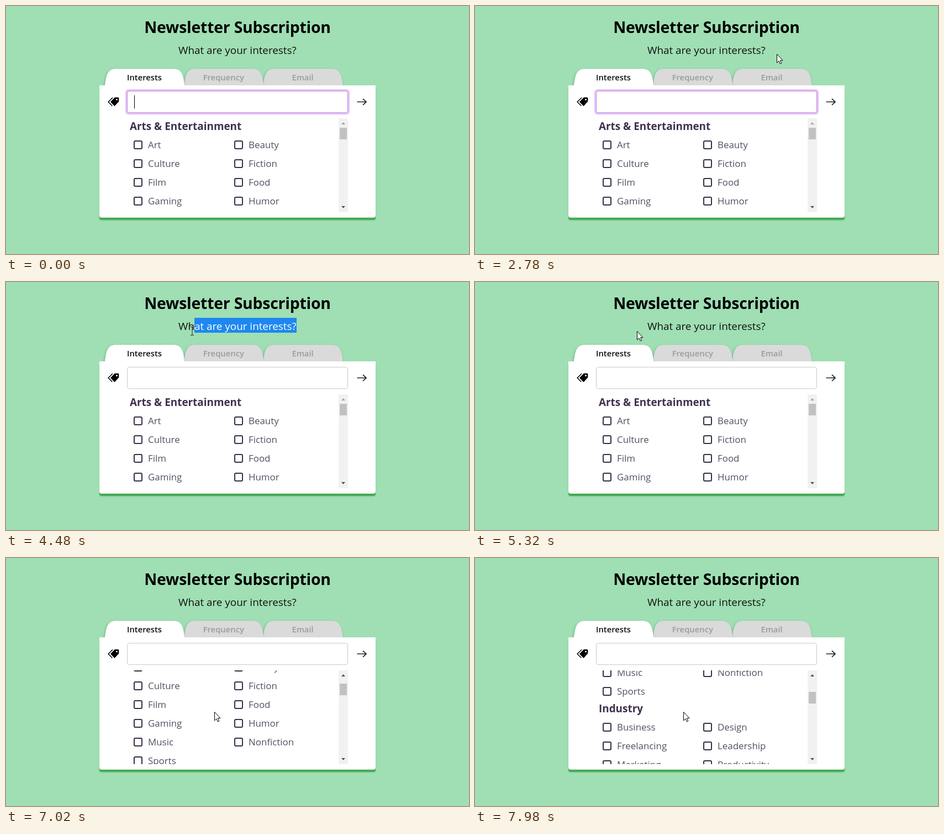
An HTML page that plays this animation: 838x450 px, repeating every 8 s.

```html
<!DOCTYPE html>
<html lang="en">
<head>
<meta charset="utf-8">
<title>Newsletter Subscription</title>
<style>
  html, body { margin: 0; width: 100%; height: 100%; overflow: hidden; background: #9fdfb3; }
  svg { display: block; width: 838px; height: 450px; font-family: "Open Sans", "Noto Sans", sans-serif; }
  .title { font-size: 28.4px; font-weight: 700; letter-spacing: -.22px; text-anchor: middle; }
  .question { font-size: 18.9px; letter-spacing: -.02px; }
  .tab { fill: #dadada; filter: drop-shadow(-1px 2px 2px rgba(0, 80, 30, .35)); }
  .tab.on { fill: #fff; }
  .tabName { font-size: 14.8px; font-weight: 600; text-anchor: middle; fill: #9b9b9b; }
  .tabName.on { fill: #111; }
  .group { font-size: 18.9px; font-weight: 700; fill: #3f304e; }
  .option { font-size: 16.9px; fill: #574c62; }
  .box { fill: none; stroke: #3a2e48; stroke-width: 2; }
</style>
</head>
<body>
<svg viewBox="0 0 838 450">
  <defs>
    <clipPath id="listClip"><rect x="219" y="204" width="383" height="170"/></clipPath>
    <clipPath id="selClip"><rect id="selArea" y="60" height="40"/></clipPath>
  </defs>
  <rect width="838" height="450" fill="#9fdfb3"/>
  <text class="title" x="419" y="49">Newsletter Subscription</text>
  <text class="question" id="question" x="312" y="87" fill="#111">What are your interests?</text>
  <rect id="selection" y="65" height="27" fill="#1e88f0"/>
  <text class="question" x="312" y="87" fill="#fff" clip-path="url(#selClip)">What are your interests?</text>

  <g id="tabs"></g>
  <path d="M169 150H669V384a4 4 0 0 1-4 4H173a4 4 0 0 1-4-4Z" fill="#43ab52" style="filter:drop-shadow(0 1px 1px rgba(50,150,70,.4))"/>
  <path d="M169 144H669V380a4 4 0 0 1-4 4H173a4 4 0 0 1-4-4Z" fill="#fff"/>

  <g id="tagIcon">
    <path d="M193 166.300L185.200 174 192.300 181.200" fill="none" stroke="#000" stroke-width="1.500"/>
    <path d="M197 165.700H202.500Q204.300 165.700 204.300 167.500V173.300L196.500 181.700 189 174Z"/>
    <circle cx="200.500" cy="169.700" r="1.500" fill="#fff"/>
  </g>
  <path d="M635.500 174H651.500M646 168.300L652 174 646 179.700" fill="none" stroke="#222" stroke-width="1.700"/>

  <rect id="glow" x="216" y="151" width="406" height="46" rx="6" fill="#e6c1fa"/>
  <rect id="field" x="219.500" y="154.500" width="399" height="39" rx="3.500" fill="#fff"/>
  <rect id="caret" x="232" y="162" width="1" height="24"/>

  <g clip-path="url(#listClip)"><g id="list"></g></g>
  <rect x="602" y="204" width="17" height="170" fill="#f1f1f1"/>
  <path id="upArrow" d="M607 215L610.500 211 614 215Z"/>
  <path d="M607 363L610.500 367 614 363Z" fill="#505050"/>
  <rect id="thumb" x="604" width="13" height="21" fill="#c1c1c1"/>

  <g id="cursor">
    <path id="arrow" d="M.5.5V16L4 12.700 6.300 18 8.700 17 6.400 11.700H11Z" fill="#fff" stroke="#000"/>
    <path id="beam" d="M-3-7.500H-1Q0-7.500 0-6.500Q0-7.500 1-7.500H3M0-6.500V6.500M-3 7.500H-1Q0 7.500 0 6.500Q0 7.500 1 7.500H3" fill="none" stroke="#222"/>
  </g>
</svg>
<script>
const LOOP = 8000;
const DRAG_LAG = 8;
const el = id => document.getElementById(id);

function add(parent, tag, attrs, text) {
  const node = document.createElementNS("http://www.w3.org/2000/svg", tag);
  for (const key in attrs) node.setAttribute(key, attrs[key]);
  if (text) node.textContent = text;
  parent.append(node);
}

function set(id, attrs) {
  for (const key in attrs) el(id).setAttribute(key, attrs[key]);
}

// Right-hand tabs first, so each one overlaps its neighbour.
["Interests", "Frequency", "Email"].map((name, i) => [name, i]).reverse().forEach(([name, i]) => {
  const on = i ? "" : " on", x = 179 + 143.3 * i;
  add(el("tabs"), "path", { class: "tab" + on, d: `M${x} 144C${x + 2} 122 ${x + 7} 114 ${x + 20} 114H${x + 124}C${x + 137} 114 ${x + 142} 122 ${x + 144} 144Z` });
  add(el("tabs"), "text", { class: "tabName" + on, x: x + 71.5, y: 135 }, name);
});

const groups = [
  ["Arts & Entertainment", 218, 252, ["Art", "Beauty", "Culture", "Fiction", "Film", "Food", "Gaming", "Humor", "Music", "Nonfiction", "Sports"]],
  ["Industry", 453, 487, ["Business", "Design", "Freelancing", "Leadership", "Marketing", "Productivity"]]
];
for (const [name, headY, firstY, options] of groups) {
  add(el("list"), "text", { class: "group", x: 224, y: headY + 7 }, name);
  options.forEach((option, i) => {
    const x = 231 + 182 * (i % 2), y = firstY + 34 * Math.floor(i / 2);
    add(el("list"), "rect", { class: "box", x: x + 1, y: y - 7, width: 14, height: 14, rx: 2 });
    add(el("list"), "text", { class: "option", x: x + 26, y: y + 6 }, option);
  });
}

// Rows of [time, values...]
const pointerPath = [
  [1000, 633, 446], [1280, 609, 222], [1420, 598, 182], [1540, 585, 145], [1680, 562, 112],
  [1960, 581, 103], [2100, 566, 94], [2240, 546, 87], [2780, 546, 87], [2900, 529, 84],
  [3100, 470, 84], [3360, 385, 87], [3540, 341, 89], [4440, 341, 89], [4620, 325, 88],
  [4900, 293, 89], [5560, 293, 89], [5800, 318, 146], [6000, 356, 232], [6180, 377, 279]
];
const scrollSteps = [
  [6720, 0], [6800, 18], [6900, 42], [7020, 54], [7100, 54], [7200, 88], [7280, 107],
  [7400, 107], [7560, 134], [7700, 152], [7820, 160], [7980, 180]
];

function sample(steps, t) {
  const next = steps.findIndex(step => step[0] > t);
  if (next < 0) return steps[steps.length - 1].slice(1);
  if (next === 0) return steps[0].slice(1);
  const a = steps[next - 1], b = steps[next];
  const k = (t - a[0]) / (b[0] - a[0]);
  return a.slice(1).map((v, i) => v + (b[i + 1] - v) * k);
}

const show = (id, visible) => set(id, { visibility: visible ? "visible" : "hidden" });

// Snaps a drag position to the nearest gap between letters.
function letterEdge(x) {
  const text = el("question");
  let best = text.getEndPositionOfChar(text.getNumberOfChars() - 1).x;
  for (let i = 0; i < text.getNumberOfChars(); i++) {
    const edge = text.getStartPositionOfChar(i).x;
    if (Math.abs(edge - x) < Math.abs(best - x)) best = edge;
  }
  return best;
}

function draw(t) {
  const [x, y] = sample(pointerPath, t);
  const inside = (left, top, right, bottom) => x >= left && x <= right && y >= top && y <= bottom;
  const onText = inside(312, 66, 526, 93) || inside(219, 154, 619, 194);
  const pointing = t >= 1000;
  set("cursor", { transform: `translate(${Math.round(x)} ${Math.round(y)})` });
  show("arrow", pointing && !onText);
  show("beam", pointing && onText);

  const focused = t < 2900;
  show("glow", focused);
  set("field", { stroke: focused ? "#bd8bda" : "#cacaca" });
  show("caret", t < 1000 || (t >= 2520 && t < 2780));

  const selecting = t >= 2900 && t < 5320;
  const edge = selecting ? letterEdge(x + DRAG_LAG) : 526;
  const span = { x: edge, width: Math.max(0, 526 - edge) };
  set("selection", span);
  set("selArea", span);

  const scroll = Math.round(sample(scrollSteps, t)[0]);
  set("list", { transform: `translate(0 ${-scroll})` });
  set("thumb", { y: Math.round(221 + scroll * .122) });
  set("upArrow", { fill: scroll ? "#505050" : "#a3a3a3" });
}

function tick() {
  draw(performance.now() % LOOP);
  requestAnimationFrame(tick);
}
tick();
</script>
</body>
</html>
```
